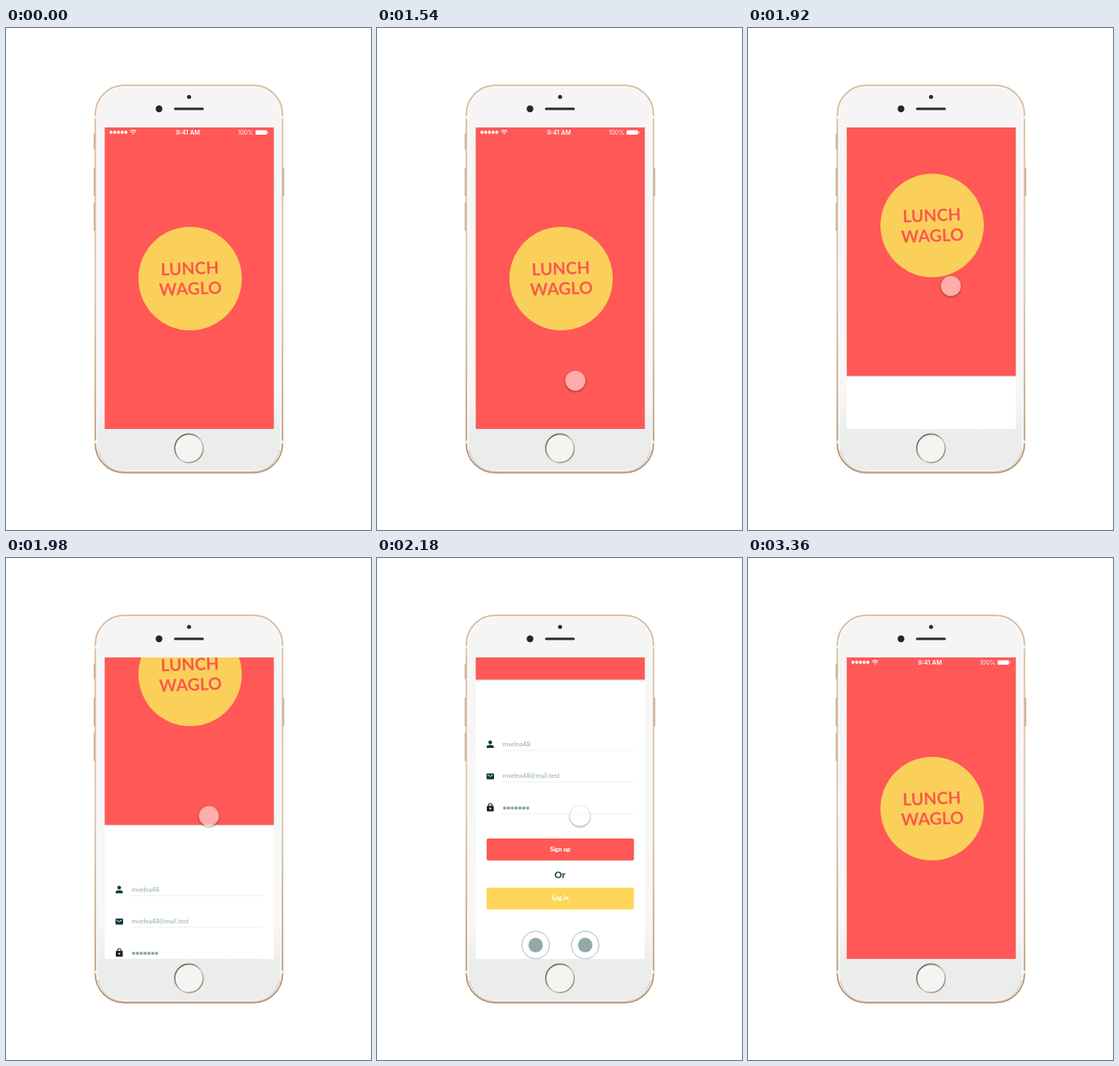
An HTML page for the animation above (3580 ms loop, 452 px wide and 621 px high).

```html
<!DOCTYPE html>
<html lang="en">
<head>
<meta charset="utf-8">
<title>App launch</title>
<style>
  html, body { margin: 0; width: 100%; height: 100%; overflow: hidden; background: #fff; }
  svg { display: block; width: 452px; height: 621px; }
  .mid { text-anchor: middle; }
  .status { font: 400 7.3px Inter, sans-serif; fill: #fff; }
  .time { font-weight: 600; font-size: 7.6px; }
  .brand { font: 700 21px Lato, sans-serif; fill: #f9584f; }
  .field { font: 8px Lato, sans-serif; fill: #90aaa9; }
  .label { font: 900 7.7px Lato, sans-serif; fill: #fff; }
  .or { font: 700 11.5px Lato, sans-serif; fill: #113b3d; }
</style>
</head>
<body>
<svg viewBox="0 0 452 621">
  <defs>
    <linearGradient id="face" x2="0" y2="1">
      <stop offset="0" stop-color="#f5f5f5"/>
      <stop offset=".8" stop-color="#f7f7f7"/>
      <stop offset=".9" stop-color="#ebedec"/>
    </linearGradient>
    <linearGradient id="gold" x2="0" y2="1">
      <stop offset="0" stop-color="#d3b999"/>
      <stop offset=".5" stop-color="#d8c5b0"/>
      <stop offset="1" stop-color="#ad8c6c"/>
    </linearGradient>
    <linearGradient id="ring" x2="1" y2="1">
      <stop offset="0" stop-color="#5f4638"/>
      <stop offset=".4" stop-color="#a98f7c"/>
      <stop offset=".6" stop-color="#d9c8b8"/>
      <stop offset="1" stop-color="#7d6049"/>
    </linearGradient>
    <clipPath id="screen"><rect x="122.3" y="123" width="209.3" height="373"/></clipPath>
    <filter id="soft" x="-50%" y="-50%" width="200%" height="200%">
      <feGaussianBlur stdDeviation="1.3"/>
    </filter>
    <mask id="rim" maskUnits="userSpaceOnUse" x="-20" y="-20" width="40" height="40">
      <rect x="-20" y="-20" width="40" height="40" fill="#fff"/>
      <circle r="12.3" fill="#000"/>
    </mask>
  </defs>

  <!-- Phone body -->
  <path d="M109.7 131v19M109.7 173v35M109.7 216v35M343.4 173v35" stroke="#bda283" stroke-width="2"/>
  <rect x="110.5" y="70.7" width="232" height="479.5" rx="36" fill="#efe7de" stroke="url(#gold)" stroke-width="1.6"/>
  <path d="M110 110.5h3M340 110.5h3M110 512h3M340 512h3" stroke="#f6f2ed" stroke-width="3.5"/>
  <rect x="112.8" y="73" width="227.4" height="474.5" rx="33.5" fill="url(#face)" stroke="#fff"/>
  <path d="M114 522Q122 548 148 548.8H305Q331 548 339 522" fill="none" stroke="#cbbfb3" stroke-width=".9"/>
  <circle cx="189.5" cy="100" r="4.2" fill="#24262a"/>
  <circle cx="226.7" cy="85.3" r="2.5" fill="#292a2c"/>
  <path d="M209.5 100h34" stroke="#2b2b2c" stroke-width="3" stroke-linecap="round"/>
  <circle cx="226.6" cy="520" r="17.6" fill="#f3f4f3" stroke="url(#ring)" stroke-width="1.6"/>

  <g clip-path="url(#screen)">
    <rect x="122" y="123" width="210" height="373" fill="#fff"/>

    <g id="form">
      <path d="M155 212h163M155 251h163M155 290.5h163" stroke="#edf0f0"/>
      <g fill="#113b3d">
        <circle cx="140.2" cy="202" r="2.3"/>
        <path d="M135.8 209v-1.4q0-2.4 4.4-2.4t4.4 2.4v1.4z"/>
        <rect x="135.6" y="240.3" width="9.4" height="7.4" rx="1"/>
        <path d="M137 242l3.3 2.2 3.3-2.2" fill="none" stroke="#fff" stroke-width=".9"/>
      </g>
      <rect x="136" y="280.3" width="8.6" height="7.2" rx="1" fill="#242222"/>
      <path d="M138.2 281v-1.6q0-1.7 2.1-1.7t2.1 1.7v1.6" fill="none" stroke="#242222" stroke-width="1.1"/>
      <circle cx="140.3" cy="283.8" r="1.1" fill="#fff"/>
      <text class="field" x="155.5" y="207">mvelna48</text>
      <text class="field" x="155.5" y="246.3">mvelna48@mail.test</text>
      <path d="M158 283.2h30" stroke="#90aaa9" stroke-width="4.2" stroke-linecap="round" stroke-dasharray="0 4.75"/>
      <rect x="136" y="322" width="182" height="27" rx="2" fill="#c8b9b9" opacity=".5"/>
      <rect x="135.7" y="321" width="182.5" height="27" rx="2" fill="#ff5856"/>
      <text class="label mid" x="227" y="336.6">Sign up</text>
      <text class="or mid" x="226.6" y="369.5">Or</text>
      <rect x="135.7" y="381.7" width="182.5" height="27" rx="2" fill="#ffd659"/>
      <text class="label mid" x="227" y="397.4">Log in</text>
      <g fill="none" stroke="#a3b9b8">
        <circle cx="196.5" cy="452.7" r="17"/>
        <circle cx="257.8" cy="452.7" r="17"/>
      </g>
      <g fill="#90aaa9">
        <circle cx="196.5" cy="452.7" r="9"/>
        <circle cx="257.8" cy="452.7" r="9"/>
      </g>
    </g>

    <g id="splash">
      <rect x="122" y="123" width="210" height="374" fill="#a55" opacity=".25"/>
      <rect x="122" y="123" width="210" height="373" fill="#ff5856"/>
      <path d="M130 129h22" stroke="#fff" stroke-width="3.8" stroke-linecap="round" stroke-dasharray="0 4.6"/>
      <g fill="none" stroke="#fff" stroke-width="1.1">
        <path d="M153.8 128q3.7-3.4 7.4 0M155.2 129.8q2.3-2.1 4.6 0"/>
        <path d="M157.5 130.6v1.4"/>
      </g>
      <text class="status time mid" x="225.3" y="131.9">9:41 AM</text>
      <text class="status" x="287" y="131.9">100%</text>
      <rect x="309" y="126.4" width="14" height="5.6" rx="1" fill="#fff"/>
      <path d="M324.2 128v2.4" stroke="#fff"/>
      <circle cx="228" cy="310" r="64" fill="#fbd05a"/>
      <g class="brand mid" transform="rotate(-2 228 310)">
        <text x="228" y="305">LUNCH</text>
        <text x="228" y="330">WAGLO</text>
      </g>
    </g>

    <g id="touch">
      <circle cy="1" r="12.8" fill="#000" opacity=".35" filter="url(#soft)" mask="url(#rim)"/>
      <circle r="12.4" fill="#fff" opacity=".5"/>
    </g>
  </g>
</svg>

<script>
  const LOOP = 3580, TOUCH_ON = 1040, RESET = 3360, SCROLL = 371.7;
  const [form, splash, touch] = ["form", "splash", "touch"].map(id => document.getElementById(id));

  const mix = (a, b, k) => a + (b - a) * k;
  const span = (t, start, end) => Math.min(1, Math.max(0, (t - start) / (end - start)));
  const smooth = k => k * k * (3 - 2 * k);
  const move = (el, x, y) => el.setAttribute("transform", `translate(${x} ${y})`);

  // cubic-bezier(.4, 0, .2, 1), solved by bisection
  function standardEase(x) {
    let lo = 0, hi = 1;
    for (let i = 0; i < 24; i++) {
      const u = (lo + hi) / 2, v = 1 - u;
      if (1.2 * u * v * v + 0.6 * u * u * v + u ** 3 < x) lo = u; else hi = u;
    }
    return smooth(lo);
  }

  function draw() {
    const t = performance.now() % LOOP;
    const active = t >= TOUCH_ON && t < RESET;
    const scroll = active ? SCROLL * standardEase(span(t, 1795, 2360)) : 0;
    move(splash, 0, -scroll);
    move(form, 0, SCROLL - scroll);

    const approach = smooth(span(t, TOUCH_ON, 1555));
    const swipe = smooth(span(t, 1560, 1810));
    move(touch,
      mix(mix(294.7, 245.5, approach), 251.3, swipe),
      mix(mix(356.7, 436.5, approach), 319.2, swipe));
    touch.style.display = active ? "" : "none";
    requestAnimationFrame(draw);
  }
  draw();
</script>
</body>
</html>
```
